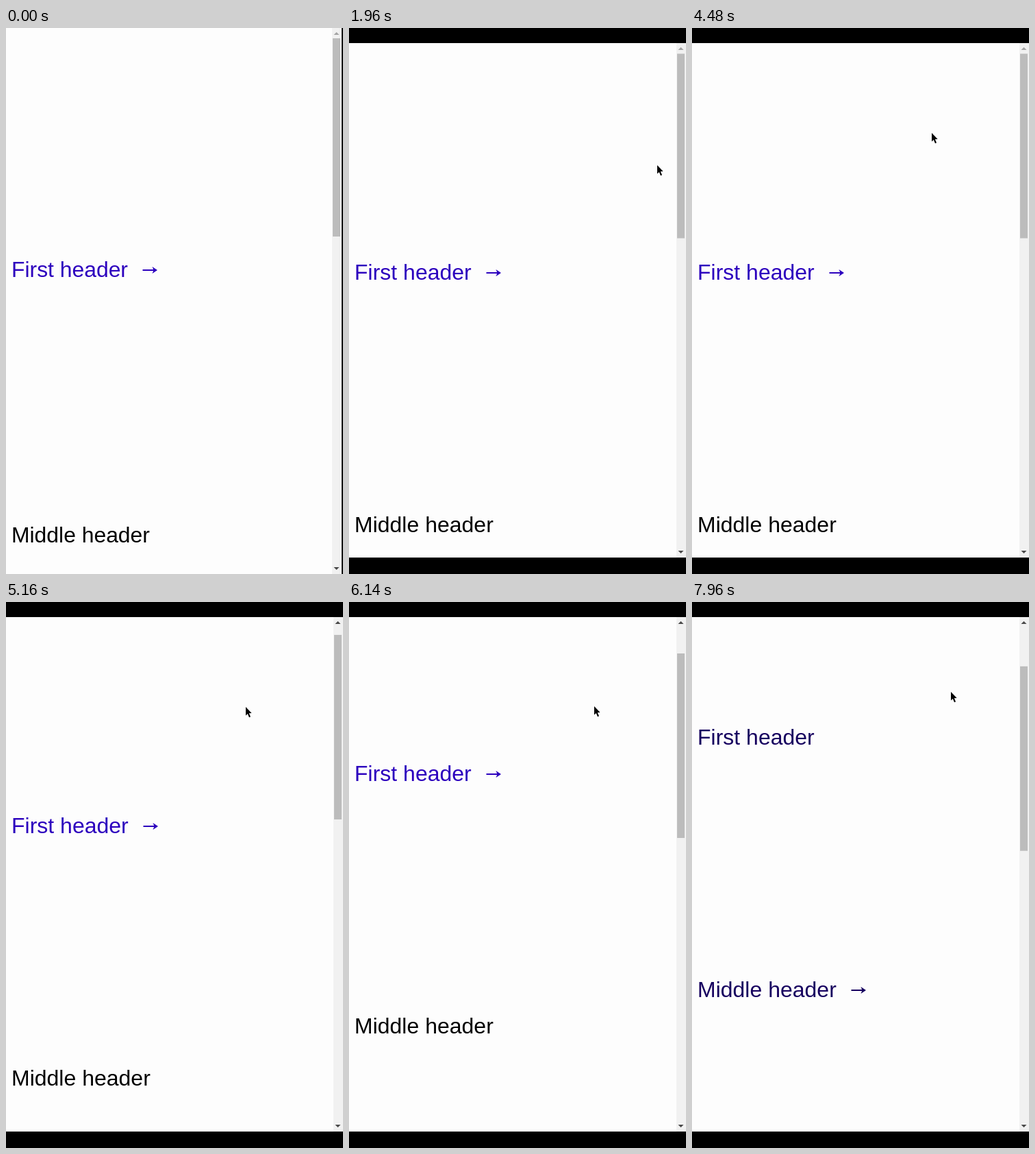
These frames come from a looping animation (492 px wide and 796 px high, 8 s). An HTML page with a canvas:

```html
<!DOCTYPE html>
<html lang="en">
<head>
<meta charset="utf-8">
<title>Scrolling headers</title>
<style>
html, body { margin: 0; width: 100%; height: 100%; overflow: hidden; background: #000; }
canvas { display: block; }
</style>
</head>
<body>
<canvas id="stage" width="492" height="796"></canvas>
<script>
const ctx = document.getElementById('stage').getContext('2d');
const LOOP = 8000;
const PAGE = '#fdfdfd';

// Each swipe scrolls a distance and slows down; a higher power brakes earlier.
const swipes = [
  { start: 4880, time: 720, distance: 64, power: 1.25 },
  { start: 5700, time: 1180, distance: 51, power: 3.7 },
  { start: 6980, time: 740, distance: 44, power: 6.6 }
];

// The pointer rests at each stop until the next.
const stops = [
  { at: 1960, x: 450, y: 200 },
  { at: 2120, x: 439, y: 197 },
  { at: 2380, x: 350, y: 153 },
  { at: 6140, x: 358, y: 152 },
  { at: 7080, x: 376, y: 133 },
  { at: 7300, x: 378, y: 131 }
];

function scrollAt(t) {
  return swipes.reduce((sum, s) => {
    const u = Math.min(1, Math.max(0, (t - s.start) / s.time));
    return sum + s.distance * (1 - (1 - u) ** s.power);
  }, 0);
}

function rect(color, x, y, w, h) {
  ctx.fillStyle = color;
  ctx.fillRect(x, y, w, h);
}

function polygon(color, x, y, points) {
  ctx.fillStyle = color;
  ctx.beginPath();
  points.forEach(([px, py]) => ctx.lineTo(x + px, y + py));
  ctx.fill();
}

function header(text, baseline, size, active, arrowX) {
  const color = `rgb(${44 * active}, 0, ${190 * active})`;
  ctx.font = `${size}px "Liberation Sans", Arial, sans-serif`;
  ctx.fillStyle = color;
  ctx.fillText(text, 8, baseline);
  if (!arrowX) return;
  const y = baseline - 10;
  rect(color, arrowX, y - 1, 17, 2);
  polygon(color, arrowX + 14, y, [[0, -5], [7.5, 0], [0, 5], [2, 0]]);
}

function scrollbar(x, top, bottom, thumbY, thumbH, atTop) {
  rect('#f1f1f1', x, top, 14, bottom - top);
  rect('#bcbcbc', x + 1, thumbY, 11, thumbH);
  polygon(atTop ? '#a3a3a3' : '#484848', x + 6.5, top + 6, [[0, 0], [4, 4], [-4, 4]]);
  polygon('#484848', x + 6.5, bottom - 10, [[-4, 0], [4, 0], [0, 4]]);
}

function pointer({ x, y }) {
  polygon('#000', x, y, [[0, 0], [0, 12.5], [2.8, 10], [5, 15.2], [7, 14.3], [4.8, 9.3], [8.6, 9]]);
}

function draw(t) {
  rect('#000', 0, 0, 492, 796);
  if (t < 540) {
    rect(PAGE, 0, 0, 476, 796);
    scrollbar(476, 0, 796, 15, 289, true);
    header('First header', 363, 31.87, 1, 199.5);
    header('Middle header', 750, 31.87, 0);
    return;
  }
  const offset = scrollAt(t);
  const scroll = Math.round(offset);
  const blend = t < 7840 ? 0 : t < 7960 ? 0.25 : 0.5;
  rect(PAGE, 0, 22, 478, 750);
  scrollbar(478, 22, 772, 37.5 + offset * 0.354, 269, scroll === 0);
  header('First header', 367 - scroll, 32, 1 - blend, blend ? 0 : 200.5);
  header('Middle header', 735 - scroll, 32, blend, blend ? 232.5 : 0);

  const stop = stops.filter(s => s.at <= t).pop();
  if (stop) pointer(stop);
}

function frame() {
  draw(performance.now() % LOOP);
  requestAnimationFrame(frame);
}
frame();
</script>
</body>
</html>
```
